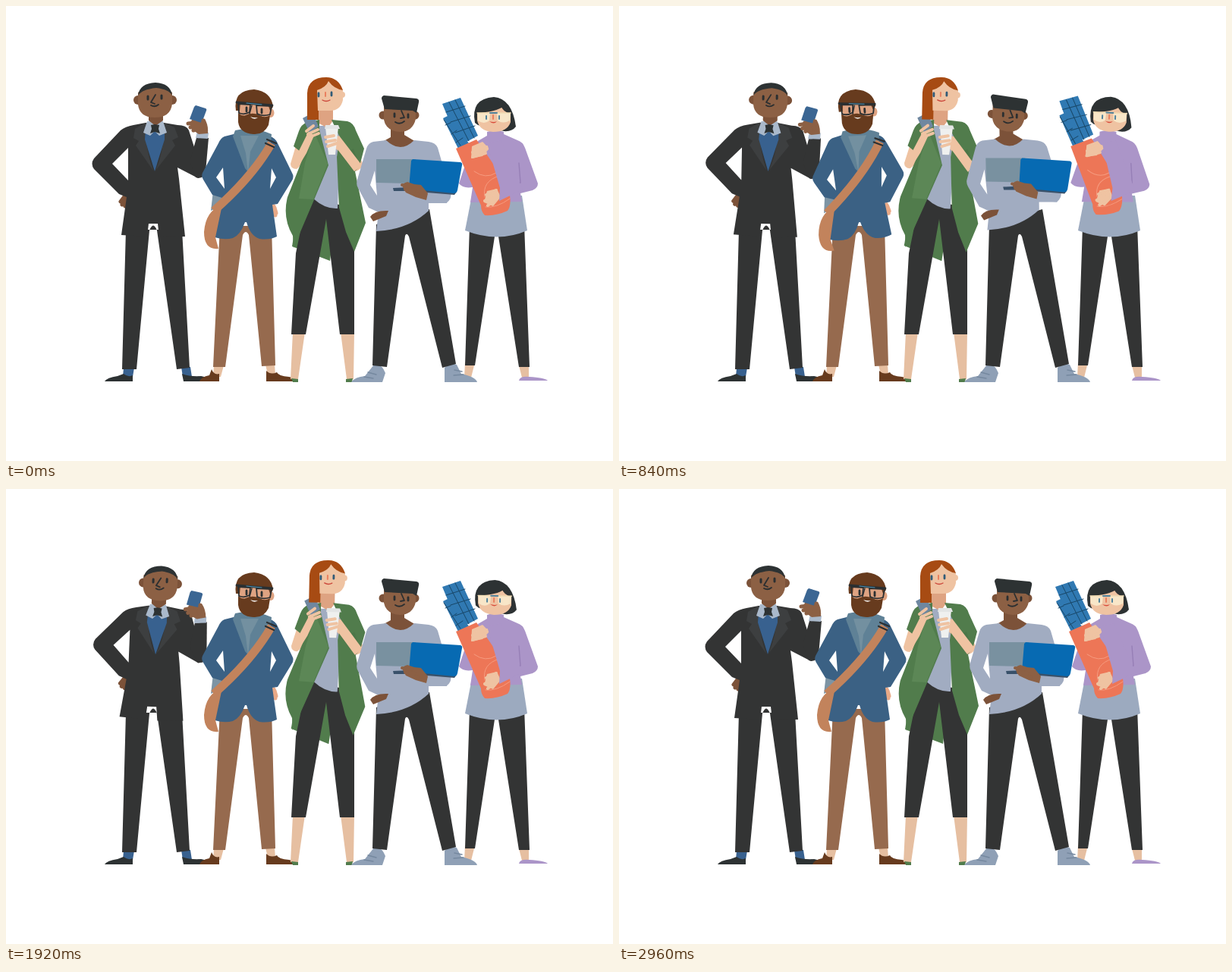
Animation, 800 px wide and 600 px high, one loop 3000 ms. Source, as an HTML page:

```html
<!DOCTYPE html>
<html lang="en">
<head>
<meta charset="utf-8">
<title>Five colleagues</title>
<style>
html, body { margin: 0; width: 100%; height: 100%; overflow: hidden; background: #fff; }
svg { display: block; width: 100vw; height: 100vh; }
.dark { fill: #333434; } .hair { fill: #2d3233; }
.brown { fill: #8c6044; } .umber { fill: #7c5239; }
.skin { fill: #efc3a2; } .ankle { fill: #e6bfa1; } .tan { fill: #dea382; }
.denim { fill: #3b6184; } .steel { fill: #5f8196; } .rust { fill: #673b1e; }
.green { fill: #517c4c; } .leaf { fill: #5c8756; }
.mist { fill: #a1acc1; } .lilac { fill: #ab95c8; } .coral { fill: #ed7657; }
.line { fill: none; stroke: #2b2f31; stroke-width: 2.2; stroke-linecap: round; stroke-linejoin: round; }
.fine { stroke-width: 1.4; }
.finger { fill: none; stroke-width: 5; stroke-linecap: round; stroke-linejoin: round; }
</style>
</head>
<body>
<svg viewBox="0 0 800 600">
  <!-- legs and shoes stand still -->
  <g>
    <path fill="#38618f" d="M155 477h14l-2 12h-13zM231 476h12l2 13h-12z"/>
    <path class="hair" d="M130 495Q133 490 147 488L155 485Q161 490 167 487V495ZM234 495L232 485Q243 489 257 488Q269 490 271 495Z"/>
    <path class="dark" d="M158 295L153 479H172L189 296Q194 283 199 296L225 479L242 477L232 295Z"/>
    <path class="ankle" d="M274 474h13l-4 15h-10zM342 473h12l1 13h-10z"/>
    <path class="rust" d="M255 495Q257 489 268 487L271 479Q274 487 281 485V495ZM343 495V481Q349 487 357 483Q359 488 373 489Q384 491 385 495Z"/>
    <path fill="#966a4e" d="M282 290L273 476H289L312 302Q316 294 320 302L337 475L355 474L350 290Z"/>
    <path class="ankle" d="M378 430h16l-9 62h-10zM441 430h18l-1 62h-9z"/>
    <path class="green" d="M376 491L385 492V496H378ZM457 491L448 492V496H456Z"/>
  </g>
  <g id="coatBack"><path class="green" d="M382 285L377 317L427 336L434 280Z"/></g>
  <path class="dark" d="M405 254L389 292L382 326L376 433H395L422 281L440 433H459V322L451 297L439 262Z"/>
  <path class="ankle" d="M605 470h13l-5 20h-9zM676 474h13v16h-9z"/>
  <path class="lilac" d="M676 494Q677 488 689 489Q710 490 714 494Z"/>
  <path class="dark" d="M611 290L605 474H618L644 304Q646 299 649 304L676 476H690L683 288Z"/>
  <path fill="#8fa0b6" d="M455 496Q460 489 473 488L485 473Q495 471 500 484L496 496ZM578 496V477Q586 470 594 473L600 485Q619 489 621 496Z"/>
  <path class="line fine" style="stroke:#75889f" d="M472 489l12 2M477 483l11 3M591 480l10 2M590 487l13-1"/>
  <path class="dark" d="M488 288L483 474L502 476L526 303Q528 298 531 304L575 477L593 472L558 268Z"/>

  <!-- man in a suit -->
  <g id="suit">
    <path class="finger" stroke="#7c5239" d="M157 250L151 258M158 253L153 262M159 257L157 264"/>
    <path class="dark" fill-rule="evenodd" d="M184 154L168 157Q157 159 151 164L116 201Q111 208 116 215L149 248L159 252L152 302L186 304L188 287H200L202 305L236 304L228 228L226 213L253 227Q260 225 260 217L248 186L241 164Q238 157 226 157L208 154ZM161 187V230L140 208Z"/>
    <path fill="#3d3f40" d="M184 154L170 162L168 174L175 178L171 184L194 217Q183 188 184 154ZM208 154L222 160L227 173L219 177L223 184L197 217Q209 190 208 154Z"/>
    <path fill="#38618f" d="M184 163H209L209 176L196 218L183 176Z"/>
    <path fill="#aab9cb" d="M186 152H207L212 167L202 171L196 165L190 171L181 167Z"/>
    <path class="umber" d="M188 143H207V151L197 158L188 151Z"/>
    <path class="hair" d="M191 157L196 156L202 157L201 162L203 168L196 166L190 168L192 162Z"/>
    <g id="phoneArm">
      <path class="dark" d="M242 205L251 174L267 174L263 219Q260 229 250 226Z"/>
      <path fill="#aab9cb" d="M252 165L267 167L266 175L250 174Z"/>
      <path class="brown" d="M245 150L262 149Q267 157 266 168L254 169Q244 163 243 154Z"/>
      <path fill="#3b6693" d="M250 131L263 135Q265 136 264 138L258 154L242 149L248 133Z"/>
      <path class="finger" stroke="#8c6044" d="M240 155L249 154M243 160L252 158M247 164L254 162"/>
      <path class="finger" stroke="#8c6044" d="M258 161L260 151"/>
    </g>
    <g id="suitHead">
      <circle class="umber" cx="174" cy="124" r="6"/><circle class="umber" cx="219" cy="124" r="6"/>
      <path class="brown" d="M174 114Q196 98 219 114V129Q217 147 196 147Q176 147 174 130Z"/>
      <path class="hair" d="M174 118Q176 102 197 101Q217 102 219 118Q215 110 198 108Q179 110 174 118Z"/>
      <path id="open" class="line" style="stroke-width:3" d="M187 119v4M205 118v4"/>
      <path id="shut" class="line fine" d="M184 122h6M202 121h6"/>
      <path class="line" style="stroke-width:1.8" d="M197 117L191 127L196 129M191 131Q196 134 201 130"/>
    </g>
  </g>

  <!-- man with a bag -->
  <g id="beard">
    <path class="finger" stroke="#e8a987" d="M353 264l2 12M354 266l2 7"/>
    <path class="steel" style="fill:#7d94a4" d="M273 244L287 242L286 262L270 270Z"/>
    <path class="denim" fill-rule="evenodd" d="M300 169L288 172Q283 174 280 181L259 220Q257 225 260 229L272 249L285 253L275 305Q288 309 299 306Q309 302 315 285H317Q322 303 334 307Q347 309 357 304L351 262L358 261L377 230Q380 225 377 220L358 181Q355 174 348 172ZM286 213L288 241L277 226ZM350 214L356 226L348 241Z"/>
    <path class="steel" d="M299 172L302 164Q326 158 350 169L349 181L320 220L315 214Z"/>
    <path fill="#7390a0" d="M309 171L333 171L322 192L319 220L316 194Z"/>
    <path fill="#c2835c" d="M285 262Q263 270 261 298Q261 322 280 320L276 305Z"/>
    <path fill="none" stroke="#c2835c" stroke-width="11" d="M350 181Q325 225 274 270"/>
    <path class="line" d="M344 176l12 5M342 181l11 5"/>
    <g id="beardHead">
      <ellipse class="tan" cx="349" cy="141" rx="4.5" ry="6"/>
      <path class="tan" d="M306 122L349 127L347 150L307 150Z"/>
      <path class="rust" d="M303 138Q299 111 327 110Q350 113 352 133L348 138L346 132L309 128L308 138Z"/>
      <path class="rust" d="M306 141Q311 146 316 144Q326 139 336 145Q342 148 348 144L346 157Q340 170 326 169Q308 168 306 153Z"/>
      <path fill="#fff" d="M322 146Q327 148 332 147Q327 151 322 146Z"/>
      <path class="line" style="stroke-width:1.8" d="M306 129L322 130L321 140Q314 144 307 141ZM330 131L350 132L348 143Q338 146 331 142Z"/>
      <path class="line" style="stroke-width:2.8" d="M304 127L351 131M317 134v5M337 136v5"/>
      <path class="line" style="stroke:#4d94b8;stroke-width:1" d="M317 128L337 130"/>
      <path class="line fine" d="M324 131L321 142"/>
    </g>
  </g>

  <!-- woman in a green coat -->
  <g id="coat">
    <path class="mist" d="M410 158H441L437 267Q420 268 404 253Z"/>
    <path class="tan" d="M411 131H431V151L424 161L411 154Z"/>
    <path class="skin" d="M383 181L375 208Q375 215 383 215L397 202L410 171L402 162L390 185ZM457 181L470 207Q471 214 461 218L439 193L425 177L437 171L458 190Z"/>
    <path class="green" d="M413 150L397 153Q389 156 386 165L379 185L393 196L371 252Q364 279 378 303L379 319L405 258L425 210L413 163Z"/>
    <path class="leaf" d="M406 166L424 208L405 255L386 254L394 207Z"/>
    <path class="green" d="M429 150L450 152Q458 154 461 164L472 188L466 211L460 218L474 286L459 324L448 298L439 266L436 199L440 173Z"/>
    <path fill="#466e42" opacity=".35" d="M458 188L466 211L460 218L441 196Z"/>
    <path class="skin" d="M384 214L396 194L406 171L399 165L379 205ZM459 218L469 210L439 171L430 180Z"/>
    <path fill="#eff0ef" d="M421 160H438L434 196H425Z"/>
    <path fill="#e3e5e5" d="M421 157H438L440 162H420Z"/>
    <path fill="#6f87a0" d="M391 148L402 142L406 145L412 159L400 167Z"/>
    <path class="finger" stroke="#efc3a2" style="stroke-width:4" d="M396 165L405 158M398 169L411 163M402 172L412 168M421 173L432 171M422 179L434 177M424 185L436 181"/>
    <g id="coatHead">
      <path fill="#a74b13" d="M397 150V115Q398 94 422 94Q438 94 444 111L412 130V150Z"/>
      <circle class="skin" cx="443" cy="117" r="4"/>
      <path class="skin" d="M410 111Q422 107 425 99Q432 109 444 111V124Q441 138 427 138H411Z"/>
      <path class="line" style="stroke:#315b77;stroke-width:2.8" d="M412 115v4M429 114v4"/>
      <path class="line" style="stroke:#e9805f;stroke-width:2" d="M421 114v5"/>
      <path class="line fine" style="stroke:#cc493c" d="M417 124Q422 127 427 124"/>
    </g>
  </g>

  <!-- woman with paper rolls -->
  <path class="mist" style="fill:#9caabf" d="M614 250L680 250L687 296Q648 313 605 296Z"/>
  <g id="sweater">
    <path class="lilac" d="M634 166Q645 162 656 166V169L674 177Q681 179 684 187L701 234Q701 240 694 243L678 247L680 258L612 259L615 239Q602 241 597 234L606 207L622 178L634 171Z"/>
    <path class="line fine" style="stroke:#967fb6" d="M676 207L678 233L650 243"/>
  </g>
  <g id="rolls">
    <path fill="#3079b2" d="M576 148L582 145L610 181L596 188ZM575 129L599 121L622 171L598 184Z"/>
    <path class="line" style="stroke:#184768;stroke-width:1" d="M580 140L605 132M586 153L612 145M592 167L618 158M584 127L610 178M592 124L617 174M577 150L599 184M579 157L586 154M587 169L594 164M593 180L602 174"/>
    <path class="coral" d="M593 188L620 176L642 208L664 250Q666 264 661 270Q646 277 631 276Q626 271 626 263Z"/>
    <path class="line fine" style="stroke:#f69b7f;stroke-width:1" d="M617 218Q632 229 646 220M631 252Q627 231 650 224M632 265Q646 267 664 254"/>
    <path class="skin" d="M614 185L628 179L637 188L628 198L613 201ZM634 244L647 241L652 252L642 264L630 259Z"/>
    <path class="finger" stroke="#efc3a2" style="stroke-width:4" d="M616 187L628 182M615 193L634 186M615 199L632 194M633 249L646 243M631 257L645 252M635 263L647 254"/>
    <path class="lilac" d="M634 181L652 177L681 242L650 257L651 240Z"/>
  </g>
  <g id="bobHead">
    <path class="hair" d="M618 154Q612 122 643 120Q667 122 672 159Q667 166 656 165L622 157Z"/>
    <path class="skin" d="M621 140Q638 139 652 129Q654 138 665 140V153Q661 166 642 166Q624 165 621 151Z"/>
    <path class="hair" d="M618 141Q620 125 645 123L656 132Q646 140 620 141ZM652 131L662 132L665 142Q655 140 652 131Z"/>
    <path fill="#f8e6c8" d="M621 141H638L637 151Q630 157 622 151ZM647 141H665L664 151Q655 156 648 151Z"/>
    <path class="line" style="stroke:#f0dcb4;stroke-width:1.5" d="M621 141H665"/>
    <path class="line" style="stroke:#51839c;stroke-width:2" d="M633 145v4M650 145v4M638 141H647"/>
    <path class="line" style="stroke:#e9805f;stroke-width:2" d="M642 144v5"/>
    <path fill="#d94c3b" d="M637 152Q643 154 647 152Q643 157 637 152Z"/>
  </g>

  <!-- man with a laptop -->
  <g id="laptop">
    <path class="umber" d="M507 155H525V170L540 179Q521 199 498 178L507 173Z"/>
    <path class="mist" fill-rule="evenodd" d="M501 177L484 179Q477 181 475 188L463 229Q461 235 464 240L478 266L491 272L488 297Q530 295 557 270V260H580Q588 255 586 246L569 187Q566 180 557 179L538 177Q520 195 501 177ZM486 217L489 250L480 236Z"/>
    <path class="umber" d="M480 278Q486 269 504 270L501 277L484 284Z"/>
    <path fill="#7991a0" d="M488 202H540L534 234L488 233Z"/>
    <path fill="#39516a" d="M510 240L532 239L594 245L591 249L530 244H511Z"/>
    <path fill="#076ab2" d="M536 202L599 206Q602 207 601 210L595 243Q594 247 590 247L531 241L534 204Z"/>
    <path class="brown" d="M523 239Q521 234 529 232L538 235L547 236L556 247L554 256L540 252L527 246Z"/>
    <path class="finger" stroke="#8c6044" style="stroke-width:4" d="M522 236L535 238M526 242L539 243M533 246L543 248"/>
    <path class="mist" d="M557 247L584 250L581 260L555 258Z"/>
    <g id="capHead">
      <circle class="umber" cx="497" cy="144" r="5.5"/><circle class="umber" cx="539" cy="144" r="5.5"/>
      <path class="brown" d="M498 131H540V149Q536 166 519 166Q501 165 498 150Z"/>
      <path class="hair" d="M498 118L541 122Q545 123 544 127L541 141L536 138L499 136L495 122Q495 119 498 118Z"/>
      <path class="line" style="stroke-width:2.8" d="M512 142v4M530 143v4"/>
      <path class="line" style="stroke-width:1.8" d="M521 138L525 147L520 148M513 153Q519 157 525 152"/>
    </g>
  </g>
</svg>
<script>
const el = id => document.getElementById(id);
const ease = x => (1 - Math.cos(Math.PI * Math.min(1, Math.max(0, x)))) / 2;
// rises from a to b, holds, then falls from c to d
const sway = (t, a, b, c, d) => ease((t - a) / (b - a)) - ease((t - c) / (d - c));
const move = (id, transform) => el(id).setAttribute("transform", transform);
const pose = (id, deg, x, y, dx = 0, dy = 0) =>
  move(id, `translate(${dx} ${dy}) rotate(${deg} ${x} ${y})`);
// slants a part above the line y
const lean = (id, deg, y, dx, dy) =>
  move(id, `translate(${dx} ${y + dy}) skewX(${deg}) translate(0 ${-y})`);

function draw(now) {
  const t = now % 3000;
  const suit = sway(t, 600, 1120, 2560, 2960);
  const left = sway(t, 0, 560, 1400, 1900);
  const coat = sway(t, 360, 840, 2000, 2500);
  const rolls = sway(t, 100, 800, 1000, 1800);
  const bob = sway(t, 100, 800, 1400, 2200);

  pose("suit", 2.4 * suit, 192, 260, -0.7 * suit);
  pose("suitHead", 0, 0, 0, 2 * suit);
  pose("phoneArm", -7 * suit, 252, 215);
  pose("beard", -4 * left, 318, 270);
  pose("beardHead", 0, 0, 0, -4 * left);
  for (const id of ["coat", "coatBack"]) pose(id, 1.2 * coat, 420, 255);
  lean("laptop", 1.3 * left, 300, -2.5 * left, -1.5 * left);
  pose("capHead", 3 * left, 518, 150, 0, left);
  pose("sweater", rolls, 650, 250, -2 * rolls);
  pose("rolls", 3 * rolls, 650, 230);
  pose("bobHead", 2.8 * bob, 650, 230);

  const blink = t >= 1240 && t < 1400;
  el("open").style.opacity = blink ? 0 : 1;
  el("shut").style.opacity = blink ? 1 : 0;
  requestAnimationFrame(draw);
}
draw(performance.now());
</script>
</body>
</html>
```
